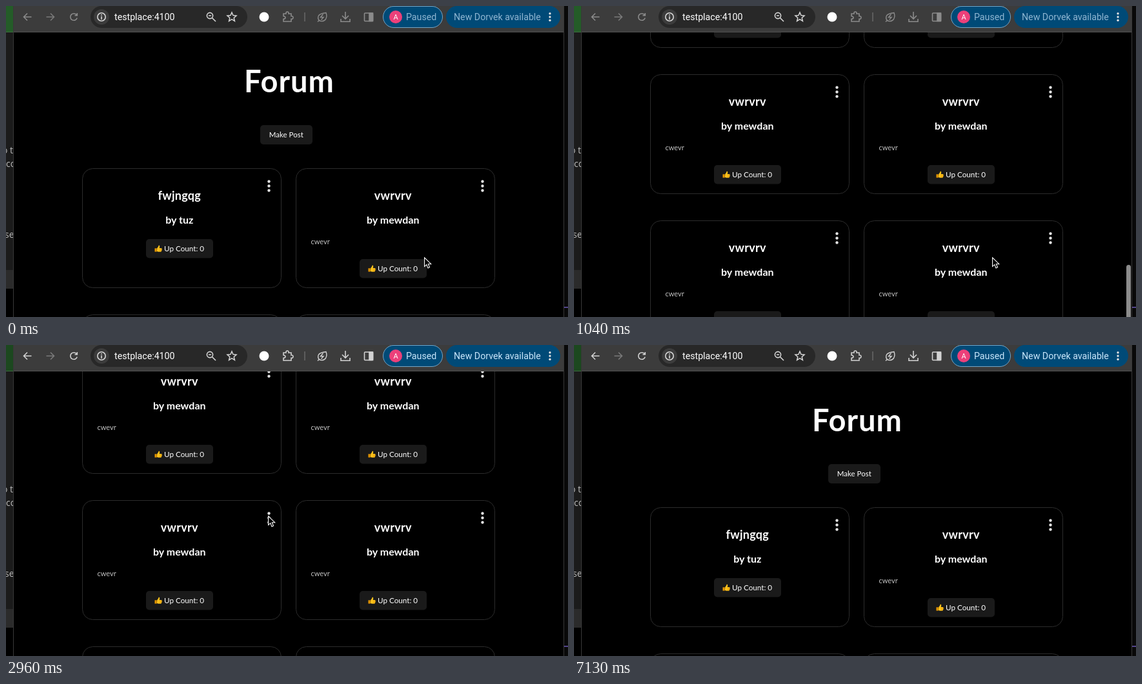
Animation of 871x483 px, one loop 8000 ms. Source, as an HTML page:

```html
<!DOCTYPE html>
<html lang="en">
<head>
<meta charset="utf-8">
<title>Forum</title>
<style>
  html, body { margin: 0; width: 100%; height: 100%; overflow: hidden; background: #000; }
  svg { display: block; width: 871px; height: 483px; --icon: #8b8b8b; --label: #8fb6d2; --green: #245c28; }
  svg.active { --icon: #d2d2d2; --label: #c9e6fb; --green: #1c481f; }
  text { font-family: Lato, "Open Sans", sans-serif; fill: #fff; white-space: pre; }
  .ui { font: 14.2px Roboto, Inter, sans-serif; }
  .mid { text-anchor: middle; }
  .bold { font-weight: 700; }
  .title { font-size: 18px; letter-spacing: .25px; }
  .small { font-size: 11.7px; }
  .note { font-size: 11px; fill: #c4c4c4; }
  .label { font-size: 15px; font-weight: 300; }
  .value { font: 15px "Liberation Sans", Arial, sans-serif; fill: #000; }
  .side { font: 14px "Open Sans", sans-serif; fill: #bbb; }
  .line { fill: none; stroke: var(--icon); stroke-width: 1.6; }
  .bright { stroke: #d6d6d6; }
  .dim { stroke: #7a7a7a; }
  .button { fill: #1a1a1a; }
  .card { fill: #000; stroke: #2c2c2c; }
  .tag { fill: var(--label); }
</style>
</head>
<body>
<svg id="stage" viewBox="0 0 871 483">
  <defs>
    <clipPath id="view"><rect x="12" y="41" width="853" height="442"/></clipPath>
    <clipPath id="edge"><rect width="11" height="483"/></clipPath>
    <g id="dots" fill="#e2e2e2">
      <circle r="2.2" cy="-7"/><circle r="2.2"/><circle r="2.2" cy="7"/>
    </g>
    <g id="thumb" transform="scale(.92)">
      <path fill="#fcc21b" d="M4 5.2 6.2 2Q6.3 0 7.4 0 9 .6 8.2 3.8L7.8 4.8H11Q12.4 5 11.9 6.2 12.6 7 11.9 7.9 12.3 8.9 11.4 9.5 11.6 11 10.2 11.2H6L3.7 10.4Z"/>
      <path fill="#e59600" d="M0 5.2H3.5V11H0Z"/>
      <path fill="none" stroke="#e59600" stroke-width=".6" d="M8 6.6H11.7M8 8.3H11.7M8 9.8H11.2"/>
    </g>
  </defs>

  <g clip-path="url(#view)">
    <g id="page">
      <text class="mid bold" x="439" y="134" font-size="47" letter-spacing="1">Forum</text>
      <rect class="button" x="394" y="185" width="81" height="30" rx="5"/>
      <text class="mid" x="434.3" y="204" font-size="11.5">Make Post</text>
      <g id="cards"></g>
      <g id="form">
        <text class="label" x="247.5" y="276">Title</text>
        <text class="label" x="247.5" y="383">Author</text>
        <text class="label" x="247.5" y="490">Description</text>
        <rect x="247.5" y="291.5" width="391.5" height="36.5" rx="5.5" fill="#fff"/>
        <rect x="247.5" y="398.5" width="391.5" height="36" rx="5.5" fill="#fff"/>
        <g id="values">
          <text class="value" x="255" y="315">vwrvrv</text>
          <text class="value" x="255" y="421.5">mewdan</text>
        </g>
      </g>
    </g>
    <rect id="bar" x="856" width="7" height="400" rx="3.5" fill="#8b8b8b"/>
  </g>

  <!-- neighbouring windows -->
  <g clip-path="url(#edge)">
    <rect width="11" height="439" fill="#1b1b1b"/>
    <rect width="11" height="41" fill="var(--green)"/>
    <path d="M0 40.5H11" stroke="#3d6b40"/>
    <rect y="410" width="11" height="29" fill="#2b2b2b"/>
    <text class="side" x="-6" y="229">o t</text>
    <text class="side" x="0" y="250">cc</text>
    <text class="side" x="-2" y="360">se</text>
  </g>
  <rect x="865" width="6" height="483" fill="#090909"/>
  <rect x="865" y="467" width="6" height="2" fill="#54468e"/>

  <!-- toolbar -->
  <rect x="12" width="853" height="41" fill="#3c3c3c"/>
  <path d="M12 40.5H865" stroke="#505050"/>
  <path d="M11.5 0V483M864.5 0V483" stroke="#383838"/>
  <rect x="131" y="0" width="243" height="34" rx="17" fill="#282828"/>
  <circle cx="148" cy="17" r="12" fill="#3c3c3c"/>
  <g class="line">
    <path d="M39.5 17H28M33 11.5 27.5 17 33 22.5"/>
    <path class="dim" d="M62.5 17H74M69 11.5 74.5 17 69 22.5"/>
    <path id="reload" d="M109.5 14A5.3 5.3 0 1 0 110.2 18.5M110.3 11V14.8H106.5"/>
    <path id="stop" d="M100.5 12.5 109.5 21.5M109.5 12.5 100.5 21.5"/>
    <path class="bright" d="M148 16V21M148 13V14.7"/>
    <circle class="bright" cx="148" cy="17" r="6.2"/>
    <circle class="bright" cx="316" cy="15" r="4.6"/>
    <path class="bright" d="M319.5 18.5 325 24M314 15H318"/>
    <path class="bright" stroke-width="1.5" d="M350 10 352 14.6 357 15.1 353.2 18.4 354.4 23.4 350 20.7 345.6 23.4 346.8 18.4 343 15.1 348 14.6Z"/>
    <path d="M430 12H434Q433.6 9 436 9T438 12H442V15.8Q445 15.5 445 18T442 20.2V24H430V20.3Q433 20 433 18T430 15.7Z"/>
    <path stroke="#666" d="M463 10V24"/>
    <path d="M496 10.5Q498 16 495.5 20.5 492 25 486.5 23 482 20 484.5 15 487 11.5 496 10.5ZM483 24.5 485.5 22" stroke-width="1.4"/>
    <path d="M491.5 12.8 487.5 17.5H492L488.5 21.5" stroke-width="1.4"/>
    <path d="M526 9V19.5M521 15 526 20 531 15M519 20V24.2H533V20"/>
    <rect x="555.5" y="11" width="13" height="12.5" rx="1"/>
    <path d="M563 11H568.5V23.5H563Z" fill="var(--icon)"/>
  </g>
  <text id="address" class="ui" x="168" y="22"></text>
  <circle cx="400" cy="17" r="7.5" fill="#fff"/>
  <rect x="584.5" y=".5" width="92" height="33" rx="16.5" fill="#004a77" stroke="#78a5c4"/>
  <circle cx="604" cy="17" r="10" fill="#ec407a"/>
  <text class="ui mid" x="604" y="21" style="font-size:11px">A</text>
  <text class="ui tag" x="620" y="22">Paused</text>
  <rect x="682" width="177" height="34" rx="17" fill="#004a77"/>
  <text class="ui tag" x="694" y="22">New Dorvek available</text>
  <use href="#dots" transform="translate(843 17) scale(.75)"/>

  <path id="cursor" d="M.6.8V14.6L3.8 11.6 6 16.9 8.5 15.8 6.3 10.7H10.7Z" fill="#000" stroke="#fff" stroke-width="1.1"/>
</svg>
<script>
const LOOP = 8000, STEP = 148.4, HOST = "testplace:4100";
const $ = id => document.getElementById(id);
const show = (id, on) => $(id).setAttribute("display", on ? "inline" : "none");
const move = (id, x, y) => $(id).setAttribute("transform", `translate(${x} ${y})`);

function card(x, y, title, author, note) {
  const top = note ? 141 : 110;
  return `<g transform="translate(${x} ${y})">
    <rect class="card" width="308" height="185" rx="16"/>
    <use href="#dots" x="289" y="27"/>
    <text class="mid bold title" x="150.3" y="48.5">${title}</text>
    <text class="mid bold" x="150.3" y="85.5" font-size="16">by ${author}</text>
    <text class="note" x="23" y="117.5">${note}</text>
    <rect class="button" x="98.5" y="${top - .5}" width="104" height="29.5" rx="5"/>
    <use href="#thumb" x="112" y="${top + 9}"/>
    <text class="small" x="126.5" y="${top + 18.5}">Up Count: 0</text>
  </g>`;
}

let cards = "";
for (let i = 0; i < 16; i++) {
  const x = i % 2 ? 449.5 : 118.5, y = 252.5 + 227 * (i >> 1);
  cards += i ? card(x, y, "vwrvrv", "mewdan", "cwevr") : card(x, y, "fwjngqg", "tuz", "");
}
$("cards").innerHTML = cards;

// Linear value between [step, value] points
function track(points, n) {
  const i = points.findIndex(p => p[0] > n);
  if (i < 0) return points[points.length - 1][1];
  if (!i) return points[0][1];
  const [a, u] = points[i - 1], [b, v] = points[i];
  return u + (v - u) * (n - a) / (b - a);
}

const scrollPath = [[0, 0], [1, 25], [2, 110], [3, 250], [4, 406], [5, 570], [6, 715],
  [7, 827], [8, 875], [9, 902], [10, 917], [14, 919]];
const cursorX = [[16, 648], [17, 590], [18, 470], [19, 406], [27, 406], [28, 411]];
const cursorY = [[16, 390], [17, 362], [18, 296], [19, 265]];

function draw(time) {
  const n = Math.floor((time % LOOP + 8) / STEP);
  const editing = n >= 24 && n < 35;
  const scroll = n < 24 ? track(scrollPath, n) : 0;

  $("stage").classList.toggle("active", n >= 19);
  move("page", 0, -scroll);
  show("cards", !editing);
  show("form", editing);
  show("values", n >= 27);
  show("bar", n > 0 && n < 16);
  $("bar").setAttribute("y", 41 + scroll * .4365);

  const address = HOST + (editing ? "/edi..." : "");
  if ($("address").textContent !== address) $("address").textContent = address;
  show("reload", n !== 35);
  show("stop", n === 35);

  const returning = n >= 45 && n < 48;
  show("cursor", n < 29 || returning);
  if (returning) move("cursor", n === 45 ? 503 : 504, n === 45 ? 452 : 420);
  else move("cursor", track(cursorX, n), track(cursorY, n));
}

const start = performance.now();
function frame() {
  draw(performance.now() - start);
  requestAnimationFrame(frame);
}
frame();
</script>
</body>
</html>
```
